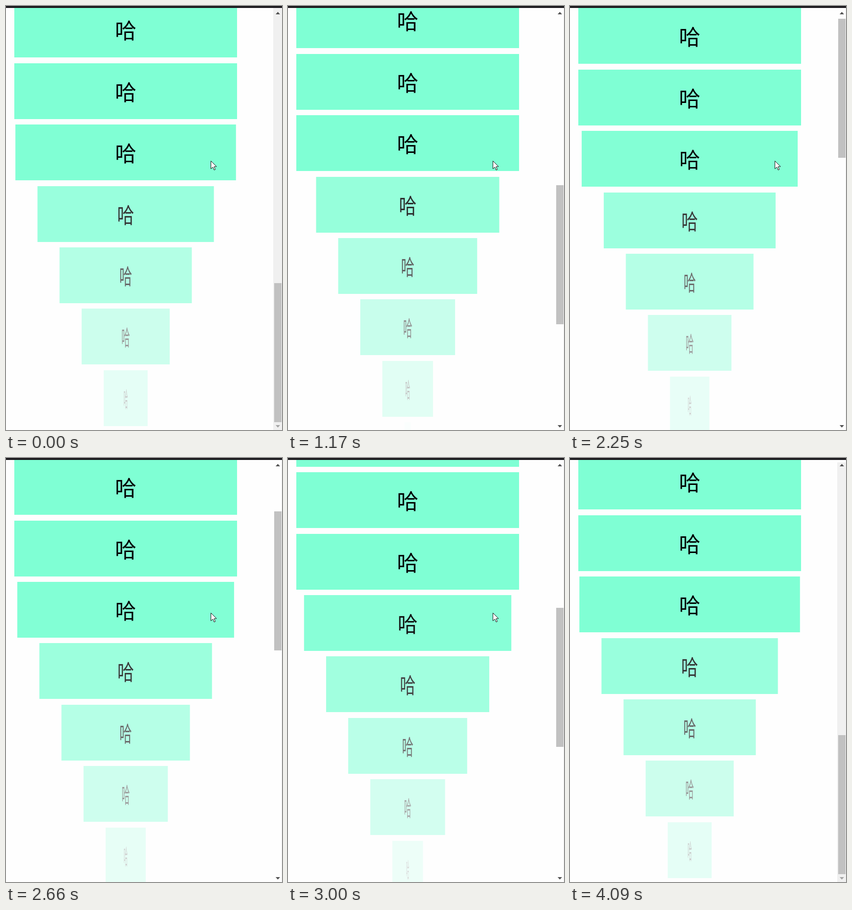
These frames come from a looping animation (565x866 px, 4910 ms). An HTML page with a canvas:

```html
<!DOCTYPE html>
<html lang="zh">
<head>
<meta charset="utf-8">
<style>
  html, body { margin: 0; width: 100%; height: 100%; overflow: hidden; background: #fefefe; }
  canvas { display: block; }
</style>
</head>
<body>
<canvas id="stage" width="565" height="866"></canvas>
<script>
const ctx = document.getElementById('stage').getContext('2d');
const LOOP = 4910, STEP = 28;
const BOTTOM = 1654.2, ITEMS = 20, PITCH = 125.4, CENTER = 245;

// Each wheel gesture is a list of [time, scroll offset]; the page rests in between.
const gestures = [
  [[0, BOTTOM]],
  [[950, 1640], [978, 1590], [1174, 1046.3]],
  [[1270, 1000], [1298, 900], [1410, 400], [1438, 307]],
  [[1610, 290], [1638, 233.1], [1722, 30], [1778, 0]],
  [[2250, 11], [2306, 70], [2390, 104]],
  [[2580, 115], [2608, 150], [2664, 264], [3000, 864.05], [3056, 932]],
  [[3190, 980], [3218, 1080], [3302, 1560], [3330, BOTTOM]],
];

// Screen refreshes happen in steps counted from the start of a movement.
const refresh = (t, start) => start + Math.floor((t - start + 6) / STEP) * STEP;

function scrollAt(t) {
  const points = gestures.filter(g => g[0][0] <= t).pop();
  const q = refresh(t, points[0][0]);
  const next = points.findIndex(p => p[0] > q);
  if (next < 0) return points[points.length - 1][1];
  const [t0, a] = points[next - 1], [t1, b] = points[next];
  return a + (b - a) * (q - t0) / (t1 - t0);
}

function rect(color, x, y, w, h) {
  ctx.fillStyle = color;
  ctx.fillRect(x, y, w, h);
}

function polygon(points, fill, stroke) {
  ctx.beginPath();
  points.forEach(([x, y]) => ctx.lineTo(x, y));
  ctx.closePath();
  ctx.fillStyle = fill;
  ctx.fill();
  if (stroke) {
    ctx.strokeStyle = stroke;
    ctx.lineWidth = 1;
    ctx.stroke();
  }
}

function drawItem(top) {
  const shown = Math.min(1, (868.5 - top) * 0.721 / 456);
  if (shown <= 0 || top < -115) return;
  const fade = channel => Math.round(254 + (channel - 254) * shown);
  ctx.save();
  ctx.translate(CENTER, Math.round(top));
  ctx.scale(shown, 1);
  rect(`rgb(${fade(127)},${fade(255)},${fade(212)})`, -228, 0, 456, 114);
  ctx.fillStyle = `rgb(${fade(0)},${fade(0)},${fade(0)})`;
  ctx.fillText('哈', 0, 76);
  ctx.restore();
}

function drawScrollbar(scroll, t) {
  const atTop = scroll <= 0, atBottom = scroll >= BOTTOM;
  const arrowColor = disabled => disabled ? '#a3a3a3' : '#505050';
  rect('#f0f0f0', 564, 4, 1, 862);
  if (atBottom) {
    const top = t > 3000 ? 9 : 4;
    rect('#f0f0f0', 547, top, 18, 866 - top);
  }
  if (t >= 1610 && t < 2250) rect('#f0f0f0', 547, 4, 17, 17);
  rect('#c1c1c1', 549, Math.round(22 + scroll * 0.329), 15, 284);
  polygon([[552, 17], [556.5, 12], [561, 17]], arrowColor(atTop));
  polygon([[552, 856], [556.5, 861], [561, 856]], arrowColor(atBottom));
}

function drawCursor(t) {
  if (t >= 4090) return;
  let k = 0;
  if (t >= 3560) {
    k = Math.min(1, (refresh(t, 3560) - 3560 + STEP) / 500);
    k = k * k * (3 - 2 * k);
  }
  ctx.save();
  ctx.translate(Math.round(419 + 100 * k) + 0.5, Math.round(316 + 543 * k) + 0.5);
  polygon([[0, 0], [0, 16], [4, 12.5], [6.5, 18.5], [9, 17.5], [6.5, 11.5], [11.5, 11.5]],
    '#fff', '#111');
  ctx.restore();
}

function draw(now) {
  const t = now % LOOP, scroll = scrollAt(t);
  rect('#fefefe', 0, 0, 565, 866);
  ctx.font = '44px "Noto Sans CJK SC", "Noto Sans CJK", sans-serif';
  ctx.textAlign = 'center';
  for (let i = 0; i < ITEMS; i++) drawItem(15.4 + i * PITCH - scroll);
  drawScrollbar(scroll, t);
  rect('#1e1c20', 0, 0, 565, 4);
  drawCursor(t);
}

const start = performance.now();
function tick() {
  draw(performance.now() - start);
  requestAnimationFrame(tick);
}
tick();
</script>
</body>
</html>
```
